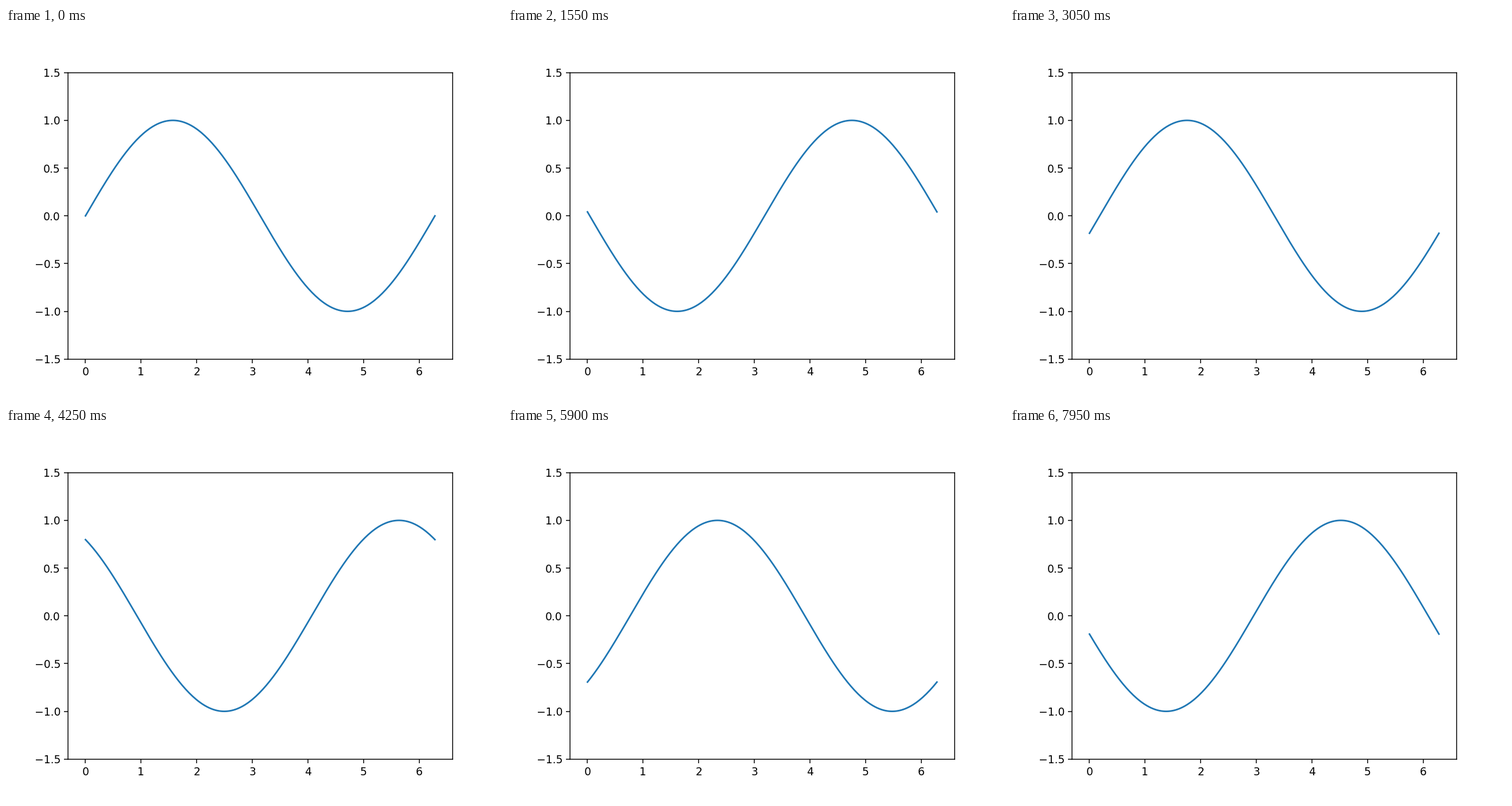
A matplotlib script for the animation above (8000 ms loop, 864 by 648 pixels).

```python
import numpy as np
import matplotlib.pyplot as plt
from matplotlib.animation import FuncAnimation

FRAMES = 160
INTERVAL = 50  # ms
PHASE_STEP = 0.1  # radians per frame

plt.rcParams["font.family"] = "DejaVu Sans"

fig, ax = plt.subplots(figsize=(6.4, 4.8), dpi=135)
x = np.linspace(0, 2 * np.pi, 200)
line, = ax.plot(x, np.sin(x), color="#1f77b4", lw=1.5)
ax.set_ylim(-1.5, 1.5)


def update(i):
    line.set_ydata(np.sin(x + PHASE_STEP * i))
    return line,


anim = FuncAnimation(fig, update, frames=FRAMES, interval=INTERVAL,
                     repeat=True, repeat_delay=0, blit=False)
plt.show()
```
